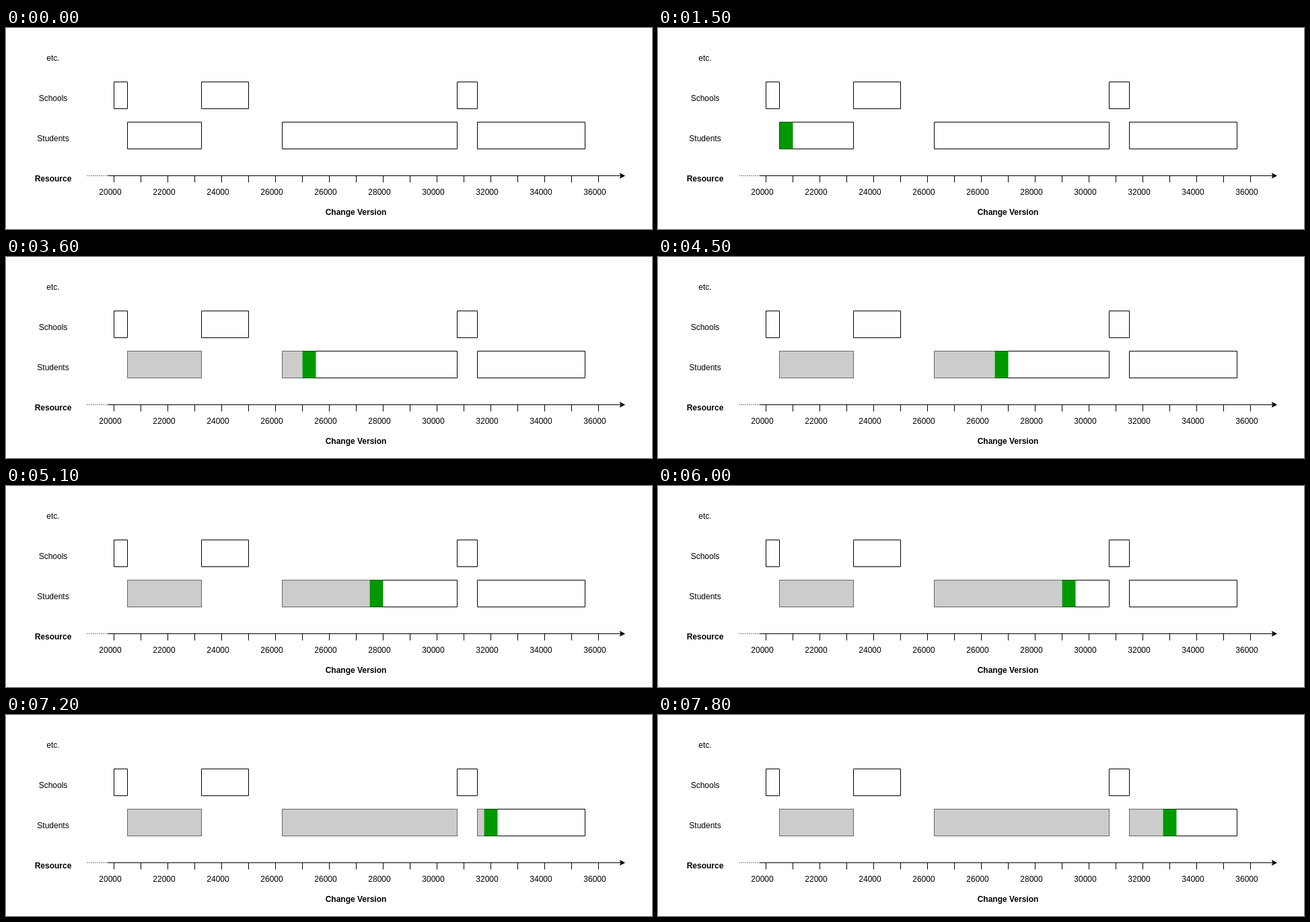
Animation of 960x300 px, one loop 8000 ms. Source, as an HTML page:

```html
<!DOCTYPE html>
<html lang="en">
<head>
<meta charset="utf-8">
<title>Change Version</title>
<style>
  html, body { margin: 0; width: 100%; height: 100%; overflow: hidden; background: #fff; }
  svg { display: block; }
  text { font: 12px "Liberation Sans", Arial, sans-serif; text-anchor: middle; fill: #000; }
  .bold { font-weight: bold; }
  .line { fill: none; stroke: #000; }
</style>
</head>
<body>
<svg width="960" height="300" viewBox="0 0 960 300">
  <g transform="translate(.5 .5)">
    <path class="line" id="boxes"/>
    <path id="done" fill="#ccc"/>
    <path id="page" fill="#090"/>
    <path class="line" d="M120 220H150" stroke-dasharray="1 2"/>
    <path class="line" d="M150 220H913.63"/>
    <path class="line" id="ticks"/>
    <path d="M918.88 220L911.88 223.5L913.63 220L911.88 216.5Z" stroke="#000"/>
  </g>
  <g id="labels">
    <text x="70" y="49">etc.</text>
    <text x="70" y="109">Schools</text>
    <text x="70" y="169">Students</text>
    <text class="bold" x="70" y="229">Resource</text>
    <text class="bold" x="520" y="279">Change Version</text>
  </g>
</svg>
<script>
  const LOOP = 8000, START = 1500, STEP = 300, PAGE = 20;
  const schools = [[160, 180], [290, 360], [670, 700]];
  const students = [[180, 290], [410, 670], [700, 860]];
  const versions = [20, 22, 24, 26, 26, 28, 30, 32, 34, 36];

  const $ = id => document.getElementById(id);
  const draw = (id, d) => $(id).setAttribute('d', d);
  const box = (a, b, y) => `M${a} ${y}H${b}V${y + 40}H${a}Z`;

  draw('boxes', schools.map(([a, b]) => box(a, b, 80)).join('') +
                students.map(([a, b]) => box(a, b, 140)).join(''));

  let ticks = '';
  for (let x = 160; x <= 880; x += 40) ticks += `M${x} 220V230`;
  draw('ticks', ticks);

  versions.forEach((v, i) => {
    const label = document.createElementNS('http://www.w3.org/2000/svg', 'text');
    label.setAttribute('x', 155 + 80 * i);
    label.setAttribute('y', 249);
    label.textContent = v * 1000;
    $('labels').append(label);
  });

  // Part of the student boxes between two offsets, with the gaps skipped
  function span(from, to) {
    let d = '', offset = 0;
    for (const [a, b] of students) {
      const left = Math.max(a, a + from - offset);
      const right = Math.min(b, a + to - offset);
      if (right > left) d += box(left, right, 140);
      offset += b - a;
    }
    return d;
  }

  let origin, shown;
  function tick(now) {
    origin ??= now;
    const n = Math.floor(((now - origin) % LOOP - START) / STEP);
    if (n !== shown) {
      shown = n;
      const pos = n * PAGE;
      draw('done', n > 0 ? span(0, pos) : '');
      draw('page', n >= 0 ? span(pos, pos + PAGE) : '');
    }
    requestAnimationFrame(tick);
  }
  requestAnimationFrame(tick);
</script>
</body>
</html>
```
